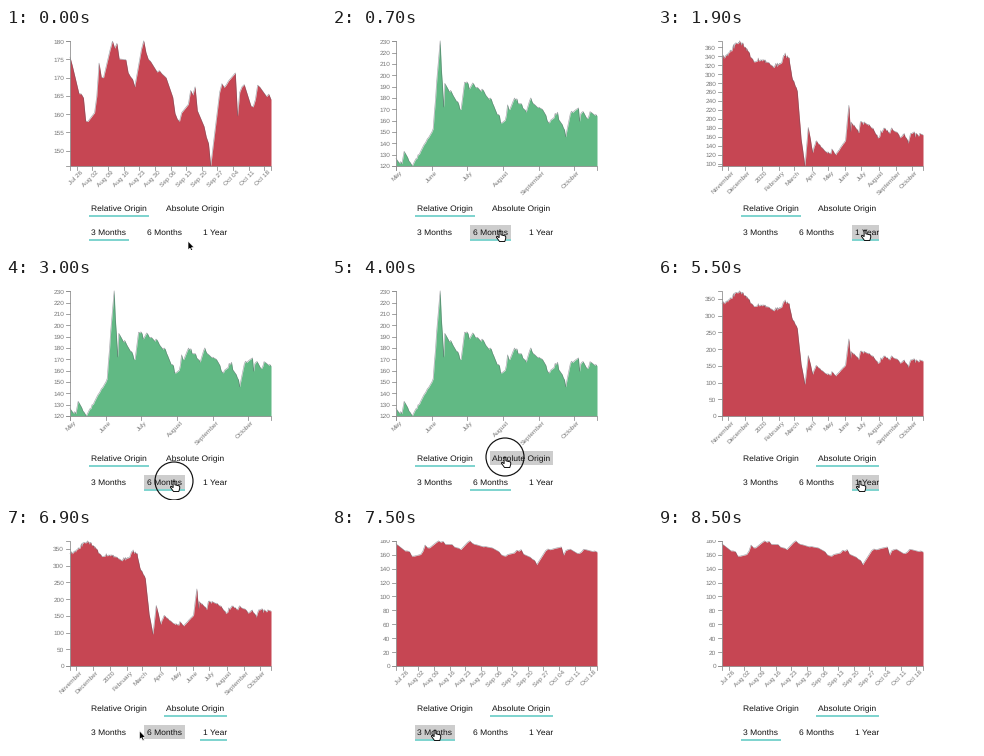
Write a matplotlib script that moves like this. It is 320 px wide and 222 px high and loops after 8900 ms.

```python
import matplotlib.pyplot as plt
import numpy as np
from matplotlib.animation import FuncAnimation
from matplotlib.patches import Circle, Polygon, Rectangle

W, H, DPI = 320, 222, 100
STEP, LOOP = 100, 8900
PT = 72 / DPI  # points per pixel
LEFT, RIGHT, TOP, BOTTOM = 64, 265, 12.8, 138
RED, GREEN, TEAL, GREY = "#c64653", "#61b984", "#80d4cf", "#cdcdcd"
AXIS, LABEL = "#8c8c8c", "#777777"

plt.rcParams.update({"font.family": "Liberation Sans", "text.hinting": "none"})

START, END = np.datetime64("2019-10-21"), np.datetime64("2020-10-21")
STARTS = {"3M": np.datetime64("2020-07-23"), "6M": np.datetime64("2020-05-01"), "1Y": START}

# Turning points of the price: (days since start, price)
TURNS = [(0, 336), (18, 352), (25, 370), (38, 370), (57, 329), (74, 332), (93, 317),
         (106, 322), (112, 342), (122, 337), (128, 290), (137, 262), (144, 155),
         (151, 95), (157, 181), (165, 125), (171, 150), (186, 130),
         (198, 122), (200, 133), (207, 120), (225, 153), (231, 230.5), (234, 172),
         (235, 193), (249, 170), (252, 194), (268, 187), (276, 175.6),
         (284, 158), (288, 165), (289, 174), (291, 170), (295, 180), (305, 167.5),
         (308, 177.8), (312, 174.5), (319, 170), (325, 158), (332, 167.5),
         (333, 161), (338, 152), (339, 145.8), (343, 166), (350, 171.3),
         (351, 159.5), (353, 167.5), (358, 162), (361, 167.4), (366, 164)]


def load_prices():
    days = np.arange(START, END + 1)
    days = days[np.is_busday(days)]
    n = (days - START).astype(int)
    turn_days, turn_prices = zip(*TURNS)
    trend = np.interp(n, turn_days, turn_prices)
    jitter = np.random.default_rng(4).normal(0, 0.008, len(n))
    jitter[np.isin(n, turn_days)] = 0
    return days, trend * (1 + jitter)


DAYS, PRICES = load_prices()

fig = plt.figure(figsize=(W / DPI, H / DPI), dpi=DPI, facecolor="white")
ax = fig.add_axes([0, 0, 1, 1])
ax.set(xlim=(0, W), ylim=(H, 0))
ax.axis("off")


def line(xs, ys, color=AXIS, width=0.8, **kw):
    return ax.plot(xs, ys, color=color, lw=width * PT, zorder=3, **kw)[0]


def label(x, y, text, size=6.5, color=LABEL, **kw):
    return ax.text(x, y, text, fontsize=size * PT, color=color, **kw)


def date_ticks(start):
    """Sundays for short ranges, first days of months for long ones."""
    days = [d.item() for d in np.arange(start, END)]
    if len(days) < 100:
        return [(d, f"{d:%b %d}") for d in days if d.weekday() == 6]
    return [(d, f"{d:%Y}" if d.month == 1 else f"{d:%B}") for d in days if d.day == 1]


def tick_step(span):
    """Smallest round step that gives at most 14 intervals."""
    return next(s for s in (5, 10, 20, 50) if span / s < 14)


def build_chart(period, absolute):
    start = STARTS[period]
    keep = DAYS >= start
    prices = PRICES[keep]
    low, high = (0 if absolute else prices.min()), prices.max()

    def px(day):
        return LEFT + (RIGHT - LEFT) * ((day - start) / (END - start))

    def py(value):
        return BOTTOM - (BOTTOM - TOP) * (value - low) / (high - low)

    xs, ys = px(DAYS[keep]), py(prices)
    fill = RED if prices[-1] < prices[0] else GREEN
    parts = [ax.fill_between(xs, ys, BOTTOM, color=fill, lw=0, zorder=2),
             line(xs, ys, "#555560", 0.6, alpha=0.55),
             line([60, LEFT, LEFT, 60], [TOP, TOP, BOTTOM, BOTTOM]),
             line([LEFT, LEFT, RIGHT, RIGHT], [142, BOTTOM, BOTTOM, 142])]
    step = 50 if absolute and period == "1Y" else 20 if absolute else tick_step(high - low)
    for v in np.arange(np.ceil(low / step) * step, high + 0.1, step):
        parts.append(line([60, LEFT], [py(v)] * 2))
        parts.append(label(58, py(v) + 0.2, f"{v:.0f}", ha="right", va="center_baseline"))
    for day, name in date_ticks(start):
        x = px(np.datetime64(day))
        parts.append(line([x, x], [BOTTOM, 142]))
        parts.append(label(x + 5, 143.6, name, ha="right", va="center",
                           rotation=45, rotation_mode="anchor"))
    return parts


class Button:
    def __init__(self, text, x, y, width):
        self.box = x, y, width, 13.7
        self.back = ax.add_patch(Rectangle((x, y), width, 13.7, fc=GREY, lw=0, zorder=4))
        self.bar = ax.add_patch(Rectangle((x, y + 13.7), width, 1.8, fc=TEAL, lw=0, zorder=5))
        label(x + 2.6, y + 9.8, text, 8.5, "#111111", va="baseline", zorder=6)

    def has(self, point):
        x, y, w, h = self.box
        return x <= point[0] <= x + w and y <= point[1] <= y + h


CHARTS = {(p, a): build_chart(p, a) for p in STARTS for a in (False, True)}
ax.add_patch(Rectangle((0, 0), W, 12.2, fc="white", lw=0, zorder=4))

BUTTONS = {"relative": Button("Relative Origin", 82.5, 173.2, 60),
           "absolute": Button("Absolute Origin", 157.5, 173.2, 63),
           "3M": Button("3 Months", 82.5, 197, 40.5),
           "6M": Button("6 Months", 138, 197, 40.5),
           "1Y": Button("1 Year", 194, 197, 27)}

ARROW = np.array([(0, 0), (0, 9), (2, 7.2), (3.4, 10.2), (4.9, 9.5), (3.5, 6.7), (6.2, 6.5)])
HAND = np.array([(-0.9, 0.2), (0.9, 0.2), (0.9, 3.8), (5.6, 5), (5.8, 7), (4.8, 10.5),
                 (-0.5, 10.5), (-3.6, 6.2), (-3, 5.2), (-0.9, 6.6)])
arrow = ax.add_patch(Polygon(ARROW, fc="black", ec="white", lw=0.7 * PT, zorder=9))
hand = ax.add_patch(Polygon(HAND, fc="white", ec="black", lw=0.9 * PT,
                            joinstyle="round", zorder=9))
ring = ax.add_patch(Circle((0, 0), 19, fill=False, ec="#111111", lw=1.2 * PT, zorder=8))

HOME = 182, 213
# Pointer moves: (start ms, end ms, to)
MOVES = [(0, 300, (168, 203)), (1000, 1400, (207, 202)), (2400, 2800, (168, 203)),
         (3500, 3900, (173, 179)), (4700, 5200, (202, 203)), (6100, 6300, (199, 204)),
         (6400, 7200, (103, 202)), (8300, 8400, (130, 209))]
# Clicks: (ms, delay until it takes effect, button)
CLICKS = [(500, 100, "6M"), (1700, 100, "1Y"), (2900, 100, "6M"),
          (4000, 200, "absolute"), (5300, 100, "1Y"), (7300, 100, "3M")]
RING_TIME, LEAVE_AT = 200, 8500


def pointer(t):
    pos = np.array(HOME, float)
    for begin, end, goal in MOVES:
        p = np.clip((t - begin) / (end - begin), 0, 1)
        pos += (goal - pos) * p * p * (3 - 2 * p)
    return pos


def draw(i):
    t = i * STEP
    done = [key for at, delay, key in CLICKS if t >= at + delay]
    period = ["3M", *(key for key in done if key in STARTS)][-1]
    origin = "absolute" if "absolute" in done else "relative"
    for key, parts in CHARTS.items():
        for part in parts:
            part.set_visible(key == (period, origin == "absolute"))

    shown = t < LEAVE_AT
    tip, last = pointer(t), pointer(t - STEP)  # hover trails the pointer by one step
    for key, button in BUTTONS.items():
        button.back.set_visible(shown and button.has(last))
        button.bar.set_visible(key in (period, origin))

    over = any(b.has(tip) for b in BUTTONS.values())
    hand.set_xy(HAND + tip)
    arrow.set_xy(ARROW + tip)
    hand.set_visible(shown and over)
    arrow.set_visible(shown and not over)
    ring.center = tuple(tip)
    ring.set_visible(any(at <= t < at + RING_TIME for at, _, _ in CLICKS))
    return []


anim = FuncAnimation(fig, draw, frames=LOOP // STEP, interval=STEP,
                     init_func=lambda: [], repeat=True, repeat_delay=0)
plt.show()
```
